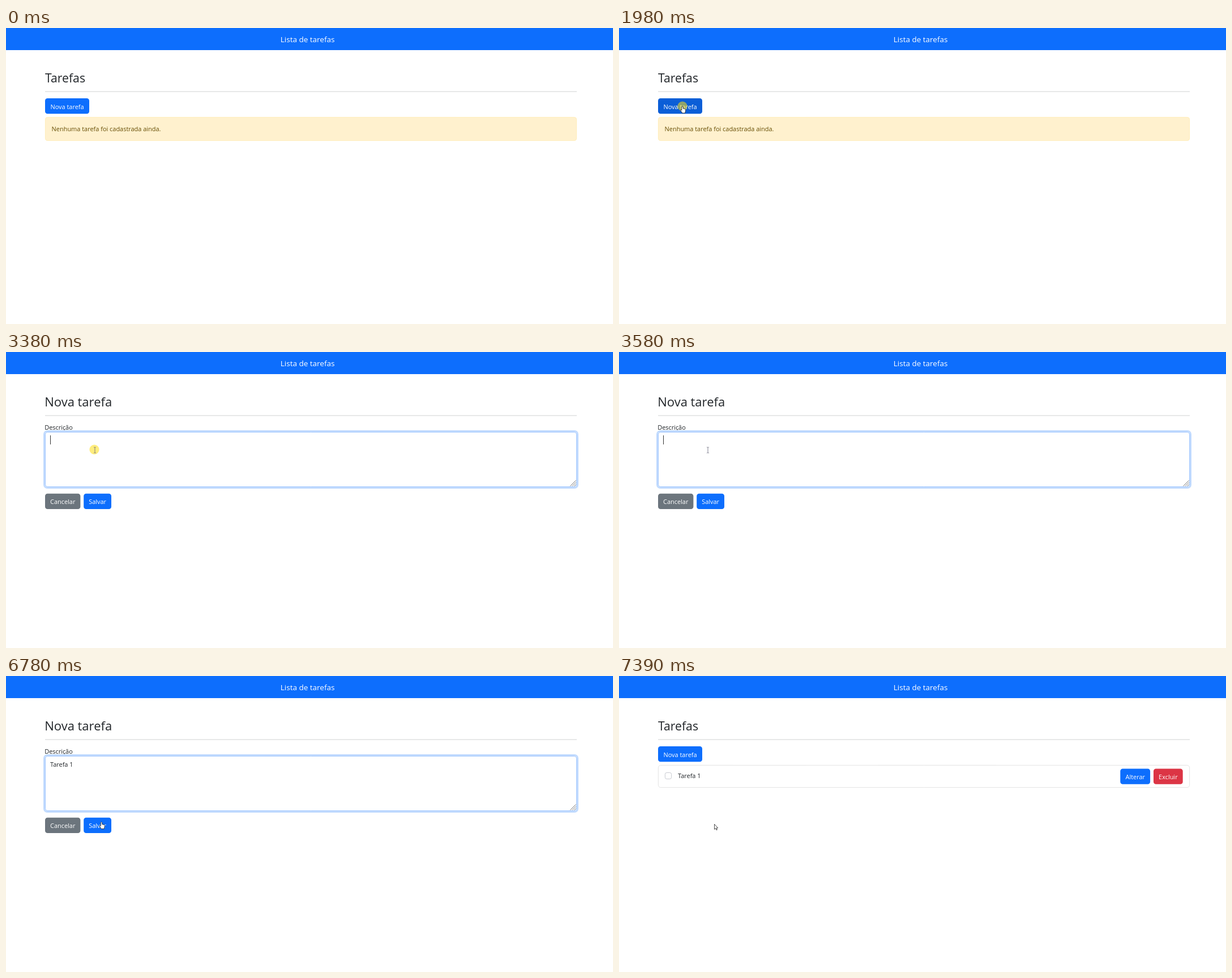
An HTML page with a canvas for the animation above (8000 ms loop, 1072x522 px).

```html
<!DOCTYPE html>
<html lang="pt-BR">
<head>
<meta charset="utf-8">
<title>Lista de tarefas</title>
<style>
  html, body { margin: 0; width: 100%; height: 100%; overflow: hidden; background: #fff; }
  canvas { display: block; }
</style>
</head>
<body>
<canvas id="stage" width="1072" height="522"></canvas>
<script>
const ctx = document.getElementById('stage').getContext('2d');
const LOOP = 8000;
const BLUE = '#0d6efd', BLUE_HOVER = '#0b5ed7', GRAY = '#6c757d', RED = '#dc3545', INK = '#212529';
const LEFT = 69, WIDTH = 939, RADIUS = 4.3, BODY = 10.95;

// [time, typed text, caret visible]
const typing = [
  [3380, '', true], [3970, 'T', true], [4170, 'Ta', true], [4580, 'Tar', true],
  [4800, 'Taref', true], [4990, 'Tarefa', true], [5190, 'Tarefa ', true], [5590, 'Tarefa 1', false]
];

// [time, x, y, shape]
const pointer = [
  ...glide(570, 202, 5, [594, 441], [112, 138]),
  [1580, 112, 138, 'hand'], [2180, 112, 138, 'arrow'],
  [2980, 136, 157, 'arrow'], [3180, 157, 173, 'beam'],
  [6190, 158, 182, 'beam'], [6390, 162, 212, 'beam'], [6590, 167, 244, 'arrow'],
  [6780, 168.5, 257.5, 'hand'], [6980, 168.5, 261, 'hand'], [7390, 168, 261, 'arrow']
];

// [start, end, x, y]
const clicks = [[1980, 2180, 112, 138], [3380, 3580, 156, 172], [7180, 7390, 168, 261]];

const shapes = {
  arrow: new Path2D('M.5 .3V9.5L2.6 7.5L4 10.7L5.4 10.1L4 7H6.7Z'),
  hand: new Path2D('M-1.2 .9Q0 -.8 1.2 .9V4L4.8 4.9Q6 5.4 5.7 7L4.7 12H-.2L-3.2 7.6Q-3.4 6 -2 6.3L-1.2 7.2Z'),
  beam: new Path2D('M-2 -5H-.6L0 -4.4L.6 -5H2M0 -4.4V4.4M-2 5H-.6L0 4.4L.6 5H2')
};

function glide(start, step, count, from, to) {
  return Array.from({ length: count }, (_, i) => {
    const u = i / count, e = u * u * (3 - 2 * u);
    return [start + i * step, from[0] + (to[0] - from[0]) * e, from[1] + (to[1] - from[1]) * e, 'arrow'];
  });
}

const latest = (list, t) => list.filter(item => item[0] <= t).pop();

function text(str, x, y, size = BODY, color = INK, align = 'left') {
  ctx.font = `${size}px "Open Sans", sans-serif`;
  ctx.textAlign = align;
  ctx.fillStyle = color;
  ctx.fillText(str, x, y);
}

function box(x, y, w, h, fill, stroke, radius = RADIUS, line = 0.8) {
  ctx.beginPath();
  ctx.roundRect(x, y, w, h, radius);
  if (fill) { ctx.fillStyle = fill; ctx.fill(); }
  if (stroke) {
    ctx.beginPath();
    ctx.roundRect(x + line / 2, y + line / 2, w - line, h - line, radius);
    ctx.strokeStyle = stroke;
    ctx.lineWidth = line;
    ctx.stroke();
  }
}

function button(label, x, y, w, color) {
  box(x, y, w, 27.3, color);
  text(label, x + w / 2, y + 18.6, BODY, '#fff', 'center');
}

function frame(title, size) {
  ctx.fillStyle = '#fff';
  ctx.fillRect(0, 0, 1072, 522);
  ctx.fillStyle = BLUE;
  ctx.fillRect(0, 0, 1072, 39);
  text('Lista de tarefas', 532.6, 24.8, 13.5, '#fff', 'center');
  text(title, LEFT - (title[0] === 'N' ? 0.8 : 0), 96, size);
  ctx.fillStyle = '#d0d1d2';
  ctx.fillRect(LEFT, 111.6, WIDTH, 1);
}

function listPage(t, saved) {
  frame('Tarefas', 21.2);
  button('Nova tarefa', LEFT, 124, 78, !saved && t >= 1580 ? BLUE_HOVER : BLUE);
  if (!saved) {
    box(LEFT, 157, WIDTH, 42, '#fff1ce', '#ffecb5');
    text('Nenhuma tarefa foi cadastrada ainda.', 80.6, 182.4, BODY, '#664d03');
    return;
  }
  box(LEFT, 157, WIDTH, 40, '#fff', '#dcdcdc');
  box(81, 170, 12, 12, '#fff', '#b9bbc4', 3);
  text('Tarefa 1', 104, 180.2);
  button('Alterar', 885.3, 163.4, 52.8, BLUE);
  button('Excluir', 944, 163.4, 51.7, RED);
}

function resizeGrip() {
  ctx.strokeStyle = '#666';
  ctx.lineWidth = 0.9;
  ctx.beginPath();
  for (const d of [10, 6.5, 3]) {
    ctx.moveTo(1006.5 - d, 236.5);
    ctx.lineTo(1006.5, 236.5 - d);
  }
  ctx.stroke();
}

function formPage(t) {
  frame('Nova tarefa', 22);
  text('Descrição', 68.3, 137.2, 10.9);
  const entry = latest(typing, t);
  if (entry) box(LEFT - 3, 138, WIDTH + 6, 103, t >= 7180 ? '#c8ddff' : '#c2dbfe', null, 7);
  box(LEFT, 141, WIDTH, 97, '#fff', entry ? '#86b7fe' : '#ced4da');
  resizeGrip();
  if (entry) {
    const [, typed, caret] = entry;
    text(typed, 78, 159.8);
    if (caret) {
      ctx.fillStyle = '#333';
      ctx.fillRect(78 + Math.round(ctx.measureText(typed).width), 147, 1, 16);
    }
  }
  button('Cancelar', LEFT, 249.8, 62.4, GRAY);
  button('Salvar', 137.2, 249.8, 48.8, t >= 6980 ? BLUE_HOVER : BLUE);
}

function drawPointer(t) {
  for (const [start, end, x, y] of clicks) {
    if (t < start || t >= end) continue;
    ctx.fillStyle = 'rgba(255, 222, 20, 0.55)';
    ctx.beginPath();
    ctx.arc(x, y, 8.6, 0, Math.PI * 2);
    ctx.fill();
  }
  const current = latest(pointer, t);
  if (!current) return;
  const [, x, y, shape] = current;
  ctx.save();
  ctx.translate(x, y);
  ctx.lineWidth = 0.8;
  ctx.strokeStyle = shape === 'beam' ? '#667' : '#222';
  if (shape !== 'beam') {
    ctx.fillStyle = '#fff';
    ctx.fill(shapes[shape]);
  }
  ctx.stroke(shapes[shape]);
  ctx.restore();
}

function render() {
  const t = performance.now() % LOOP;
  if (t >= 2180 && t < 7390) formPage(t);
  else listPage(t, t >= 7390);
  drawPointer(t);
  requestAnimationFrame(render);
}
render();
</script>
</body>
</html>
```
